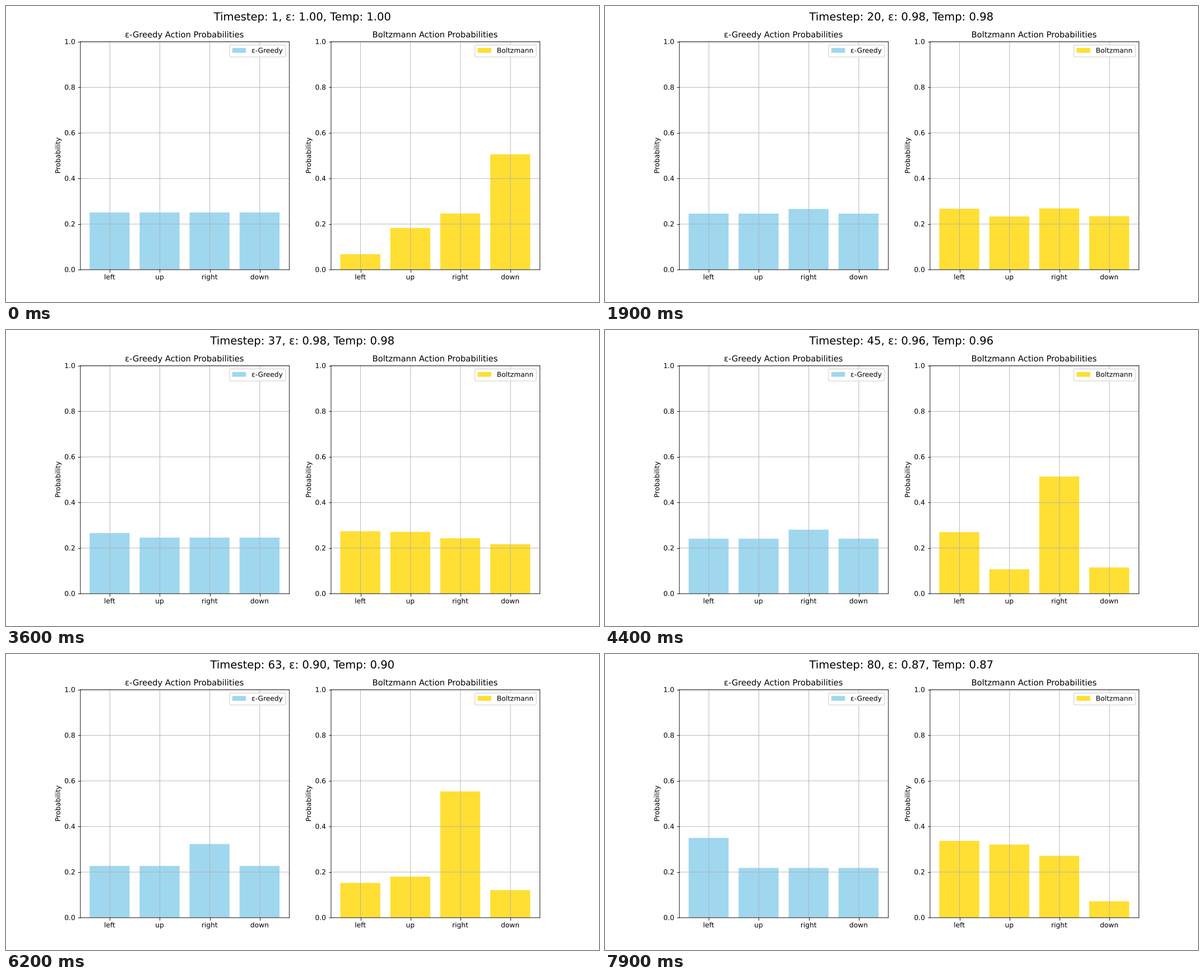
Recreate the animation shown at these times as a matplotlib script. Size 1058x529 px, loop 8 s.

```python
import numpy as np
import matplotlib.pyplot as plt
from matplotlib.animation import FuncAnimation
from matplotlib.patheffects import Normal, Stroke

FRAMES, INTERVAL = 80, 100
ACTIONS = ["left", "up", "right", "down"]

# Key Boltzmann distributions: step -> probability of each action
KEYS = {
    0: (0.067, 0.182, 0.245, 0.505),
    12: (0.266, 0.230, 0.270, 0.234),
    27: (0.273, 0.284, 0.219, 0.225),
    44: (0.269, 0.106, 0.513, 0.114),
    54: (0.083, 0.189, 0.604, 0.128),
    68: (0.725, 0.096, 0.124, 0.054),
    79: (0.336, 0.320, 0.270, 0.071),
}
DECAY = 0.98
DECAY_STEPS = [8, 41, 45, *range(57, 67, 3)]

steps = list(KEYS)
poses = np.array(list(KEYS.values()))


def boltzmann(step):
    """Ease in from the last key distribution to the next."""
    pos = np.interp(step, steps, range(len(steps)))
    i = min(int(pos), len(steps) - 2)
    return poses[i] + (poses[i + 1] - poses[i]) * (pos - i) ** 4


def epsilon(step):
    return DECAY ** sum(step >= s for s in DECAY_STEPS)


def greedy(step):
    eps = epsilon(step)
    probs = np.full(len(ACTIONS), eps / len(ACTIONS))
    probs[np.argmax(boltzmann(step))] += 1 - eps
    return probs


def make_panel(ax, name, color, probs):
    bars = ax.bar(ACTIONS, probs, color=color, alpha=0.8, label=name)
    ax.set_ylim(0, 1)
    ax.set_title(f"{name} Action Probabilities")
    ax.set_ylabel("Probability")
    ax.grid(True)
    ax.legend(loc="upper right")
    # thin lines sit just right of and below their exact places
    lines = [*ax.spines.values()]
    for axis in (ax.xaxis, ax.yaxis):
        lines += [*axis.get_gridlines(), *axis.get_ticklines()]
    for line in lines:
        line.set_path_effects([Stroke(offset=(0.36, -0.36))])
    return bars


def heading(step):
    eps = epsilon(step)
    return f"Timestep: {step + 1}, ε: {eps:.2f}, Temp: {eps:.2f}"


# soft, unsnapped lines and outline text
plt.rcParams.update({
    "font.family": "DejaVu Sans",
    "text.hinting": "none",
    "path.snap": False,
    "path.effects": [Normal()],
    "axes.linewidth": 0.72,
    "grid.linewidth": 0.72,
    "xtick.major.width": 0.72,
    "ytick.major.width": 0.72,
})
fig, (ax_left, ax_right) = plt.subplots(1, 2, figsize=(12, 6), dpi=529 / 6)
title = fig.suptitle(heading(0), fontsize=16)
panels = [
    (make_panel(ax_left, "ε-Greedy", "skyblue", greedy(0)), greedy),
    (make_panel(ax_right, "Boltzmann", "gold", boltzmann(0)), boltzmann),
]


def update(step):
    title.set_text(heading(step))
    for bars, policy in panels:
        for bar, p in zip(bars, policy(step)):
            bar.set_height(p)
    return [title]


anim = FuncAnimation(fig, update, frames=FRAMES, interval=INTERVAL,
                     init_func=lambda: update(0), repeat=True, repeat_delay=0)
plt.show()
```
